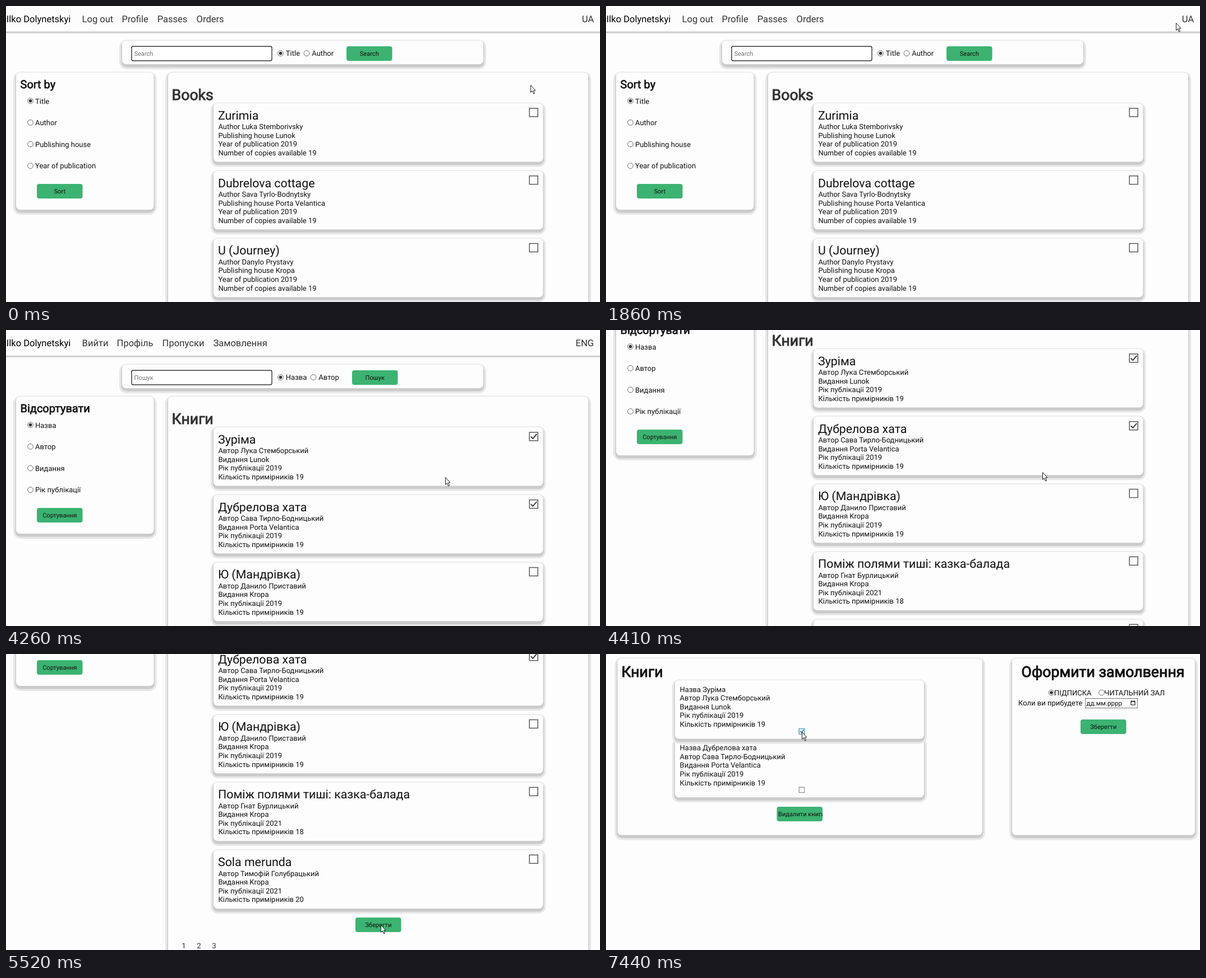
Animation, 1059 px wide and 529 px high, one loop 8 s. Source, as an HTML page:

```html
<!DOCTYPE html>
<html lang="uk">
<head>
<meta charset="utf-8">
<title>Library</title>
<style>
  html, body { margin: 0; width: 100%; height: 100%; overflow: hidden; background: #fdfdfd; }
  svg { display: block; width: 100vw; height: 100vh; font-family: Roboto, sans-serif; text-rendering: geometricPrecision; }
  .link { fill: #333; }
  .bold { stroke: currentColor; stroke-linejoin: round; }
  .hover { fill: #3ba56a; color: #3ba56a; text-decoration: underline; }
</style>
</head>
<body>
<svg id="stage" viewBox="0 0 1059 529"></svg>
<script>
const LOOP = 8000, GREEN = '#3cb371', PAPER = '#fdfdfd';
const PITCH = 120.85, LINE = 15.57, BODY = 13, SMALL = 11.1, NAV = 16.53;

const words = {
  en: {
    nav: [['Log out', 135.6], ['Profile', 206.5], ['Passes', 269.7], ['Orders', 339.6]],
    lang: 'UA', search: 'Search', by: ['Title', 'Author'], byX: 536, go: 607,
    sortBy: 'Sort by', sorts: ['Title', 'Author', 'Publishing house', 'Year of publication'], sort: 'Sort',
    books: 'Books', labels: ['Author', 'Publishing house', 'Year of publication', 'Number of copies available']
  },
  ua: {
    nav: [['Вийти', 135.6], ['Профіль', 197.6], ['Пропуски', 278.6], ['Замовлення', 369.4]],
    lang: 'ENG', search: 'Пошук', by: ['Назва', 'Автор'], byX: 548, go: 617,
    sortBy: 'Відсортувати', sorts: ['Назва', 'Автор', 'Видання', 'Рік публікації'], sort: 'Сортування',
    books: 'Книги', labels: ['Автор', 'Видання', 'Рік публікації', 'Кількість примірників']
  }
};

const books = [
  { en: ['Zurimia', 'Luka Stemborivsky'], ua: ['Зуріма', 'Лука Стемборський'], facts: ['Lunok', 2019, 19] },
  { en: ['Dubrelova cottage', 'Sava Tyrlo-Bodnytsky'], ua: ['Дубрелова хата', 'Сава Тирло-Бодницький'], facts: ['Porta Velantica', 2019, 19] },
  { en: ['U (Journey)', 'Danylo Prystavy'], ua: ['Ю (Мандрівка)', 'Данило Приставий'], facts: ['Kropa', 2019, 19] },
  { ua: ['Поміж полями тиші: казка-балада', 'Гнат Бурлицький'], facts: ['Kropa', 2021, 18] },
  { ua: ['Sola merunda', 'Тимофій Голубрацький'], facts: ['Kropa', 2021, 20] }
];

const text = (x, y, s, size = BODY, attrs = 'fill="#111"') =>
  `<text x="${x}" y="${y}" font-size="${size}" ${attrs}>${s}</text>`;
const rect = (x, y, w, h, r, fill, attrs = '') =>
  `<rect x="${x}" y="${y}" width="${w}" height="${h}" rx="${r}" fill="${fill}" ${attrs}/>`;
const group = (id, body) => `<g id="${id}">${body}</g>`;

const panel = (x, y, w, h) =>
  rect(x - 5, y - 1.5, w + 10, h + 10.5, 13, '#e7e7e7') +
  rect(x - 1.5, y + 1, w + 3, h + 4.5, 9, '#cbcbcb') +
  rect(x, y, w, h, 7, PAPER);

const heading = (x, y, s, size, color, attrs = '') =>
  text(x, y, s, size, `fill="${color}" color="${color}" stroke-width="${size / 28}" ${attrs.includes('class') ? attrs : 'class="bold" ' + attrs}`);

const radio = (x, y, on) =>
  `<circle cx="${x}" cy="${y}" r="4.9" fill="#fff" stroke="#666"/>` +
  (on ? `<circle cx="${x}" cy="${y}" r="2.8" fill="#333"/>` : '');

const button = (x, y, s) =>
  rect(x, y, 81.5, 26, 4, GREEN) + text(x + 40.75, y + 17, s, SMALL, 'text-anchor="middle" fill="#111"');

const lines = (x, y, rows) => rows.map((s, i) => text(x, y + i * LINE, s)).join('');
const facts = (book, lang) =>
  [book[lang][1], ...book.facts].map((v, i) => `${words[lang].labels[i]} ${v}`);

function card(book, i, lang) {
  const y = 174 + i * PITCH;
  return panel(370, y, 587.5, 104.5) +
    text(378, y + 28.7, book[lang][0], 21.33) +
    lines(378.4, y + 46.2, facts(book, lang)) +
    rect(933.2, y + 8.8, 15, 15, 0, PAPER, 'stroke="#5a5a5a" stroke-width="1.5"');
}

function catalog(lang) {
  const w = words[lang];
  return rect(0, 45.5, 1059, 3.2, 0, '#cfcfcf') +
    text(0.8, 28.7, 'Ilko Dolynetskyi', NAV, 'fill="#000"') +
    w.nav.map(([s, x]) => text(x, 28.7, s, NAV, 'class="link"')).join('') +
    text(1048, 28.7, w.lang, NAV, 'class="link" data-link="lang" text-anchor="end"') +
    panel(207, 62, 644, 42) +
    rect(224, 72.2, 250, 25.6, 2.5, '#fff', 'stroke="#111" stroke-width="1.2"') +
    text(228.4, 89.4, w.search, SMALL, 'fill="#777"') +
    radio(489.5, 84.5, true) + text(498.8, 89, w.by[0]) +
    radio(w.byX, 84.5) + text(w.byX + 9.3, 89, w.by[1]) +
    button(w.go, 72, w.search) +
    panel(18, 119, 245.5, 245) +
    heading(25.5, 146.6, w.sortBy, 20, '#111') +
    w.sorts.map((s, i) => radio(43.5, 169.6 + i * 38.65, !i) + text(52, 174.5 + i * 38.65, s)).join('') +
    button(55, 318, w.sort) +
    panel(289, 119, 749, 800) +
    heading(295.6, 168, w.books, 26.67, '#333', 'class="bold" data-link="books"') +
    books.map((b, i) => b[lang] ? card(b, i, lang) : '').join('') +
    button(623, 778, 'Зберегти') +
    [1, 2, 3].map(n => text(286.3 + n * 27, 832.6, n, 13.3, 'fill="#333"')).join('');
}

const mark = i => group('mark' + i,
  `<path d="M935.6 ${190.3 + i * PITCH}l3.7 3.8l7-8.2" fill="none" stroke="#333" stroke-width="1.9"/>`);

const orderPanels = h => panel(20.5, 8, 650.5, h) + panel(724, 8, 326, h);

const orderCard = i => {
  const y = 47 + i * 104.7;
  return panel(123, y, 444, 104.5) +
    lines(131.6, y + 20.6, ['Назва ' + books[i].ua[0], ...facts(books[i], 'ua')]) +
    rect(344.2, y + 86.4, 9.6, 9.6, 0, '#fff', 'stroke="#767676"');
};

const order =
  group('short', orderPanels(256.5)) +
  group('long', orderPanels(315.5) + rect(304.5, 273, 81.5, 26, 4, GREEN) +
    text(307, 290, 'Видалити книги', SMALL, 'fill="#111" clip-path="url(#label)"')) +
  heading(27.4, 41.4, 'Книги', 26.67, '#111') +
  heading(886, 41.4, 'Оформити замолвення', 26.67, '#111', 'text-anchor="middle"') +
  orderCard(1) + orderCard(0) +
  group('picked', rect(344.2, 133.4, 9.6, 9.6, 0, '#e4f2fc', 'stroke="#3a98d8"') +
    '<path d="M346 138l2.3 2.4l4.2-5" fill="none" stroke="#2b6f9e" stroke-width="1.3"/>') +
  radio(794, 69, true) + text(799, 74, 'ПІДПИСКА') +
  radio(883.6, 69) + text(888.5, 74, 'ЧИТАЛЬНИЙ ЗАЛ') +
  text(735, 92.4, 'Коли ви прибудете') +
  rect(854.5, 79.5, 93, 17, 0, '#fff', 'stroke="#767676"') +
  text(856.6, 92.2, 'дд.мм.рррр', 11.6) +
  '<path d="M936 85h7v6h-7zM935.5 84.5h8M937.5 83v2M941.5 83v2" fill="none" stroke="#111" stroke-width="1.2"/>' +
  button(846, 117, 'Зберегти');

const status = rect(-2, 514.5, 144.5, 20, 0, '#fff', 'stroke="#bbb"') +
  text(-0.5, 530.2, 'fellihost:5190/?initial=yes', 10.6, 'fill="#666" font-family="Open Sans, sans-serif"');

const arrow = '<path d="M.5.5V13.4L3.3 10.7L5.5 16L7.5 15.1L5.3 10H9Z"/>';
const hand = '<path d="M-1.4 11V1.2Q-1.4 0 0 0T1.4 1.2V6.6Q2.8 5.4 4 7Q5.4 6 6.4 7.5Q8.2 7 8.2 9V13Q8 16 6.5 18.5H-.5Q-3.5 14.5-5 11.5Q-4.5 9-1.4 11Z"/>';

document.getElementById('stage').innerHTML =
  '<defs><clipPath id="label"><rect x="304" y="273" width="82" height="26"/></clipPath></defs>' +
  rect(0, 0, 1059, 529, 0, PAPER) +
  group('page', group('en', catalog('en')) + group('ua', catalog('ua')) + mark(0) + mark(1)) +
  group('order', order) + group('status', status) +
  `<g id="cursor" fill="#fff" stroke="#111" stroke-width=".95" stroke-linejoin="round">${group('arrow', arrow)}${group('hand', hand)}</g>`;

const clock = [[0, 0], [120, 1], [1080, 8], [1230, 9], [1860, 14], [2160, 16], [2310, 17], [2820, 21],
  [3210, 24], [3360, 25], [4260, 32], [4410, 33], [4530, 34], [5400, 40], [5520, 41], [6480, 48],
  [6630, 49], [7440, 55], [8000, 55.9]];

// [tick, x, y] of the pointer tip
const path = [[0, 935, 141], [3, 922, 150], [8, 905, 160], [10, 903, 146], [12, 915, 112], [13, 952, 75],
  [14, 1016, 30], [16, 1036, 23], [17, 1036, 23], [18, 1033, 27], [21, 961, 165.5], [23, 945, 186],
  [24, 943, 188], [26, 943, 188], [28, 942, 309], [29, 942, 309], [30, 930, 306], [32, 783, 263],
  [34, 773, 245], [36, 764, 262], [39, 668, 484], [42, 668, 484], [43, 664, 462], [45, 640, 230],
  [47, 400, 135], [48, 337, 128], [51, 349, 139], [56, 349, 139]];

function along(keys, at, col) {
  const i = Math.max(1, keys.findIndex(k => k[0] > at));
  const a = keys[i - 1], b = keys[i];
  return a[col] + (b[col] - a[col]) * (at - a[0]) / (b[0] - a[0]);
}

const el = id => document.getElementById(id);
const show = (id, on) => el(id).setAttribute('display', on ? 'inline' : 'none');
const links = [...document.querySelectorAll('[data-link]')];

function draw(ms) {
  const tick = Math.floor(along(clock, ms, 1) + 1e-6);
  const x = along(path, tick, 1), y = along(path, tick, 2);
  const scroll = tick < 33 ? 0 : tick < 34 ? 140 : 307;
  const ordering = tick >= 42, picked = tick >= 52;
  let over = '';
  if (!scroll && x > 1022 && y < 36) over = 'lang';
  else if (!scroll && x > 297 && x < 1030 && y > 143 && y < 174) over = 'books';

  show('page', !ordering);
  show('order', ordering);
  show('en', tick < 17);
  show('ua', tick >= 17);
  show('mark0', tick >= 25);
  show('mark1', tick >= 29);
  show('short', !picked);
  show('long', picked);
  show('picked', picked);
  show('status', over);
  show('hand', over);
  show('arrow', !over);
  for (const link of links) link.classList.toggle('hover', link.dataset.link === over);
  el('page').setAttribute('transform', `translate(0 ${-scroll})`);
  el('cursor').setAttribute('transform', `translate(${x} ${y})`);
}

const start = performance.now();
function frame() {
  draw((performance.now() - start) % LOOP);
  requestAnimationFrame(frame);
}
frame();
</script>
</body>
</html>
```
